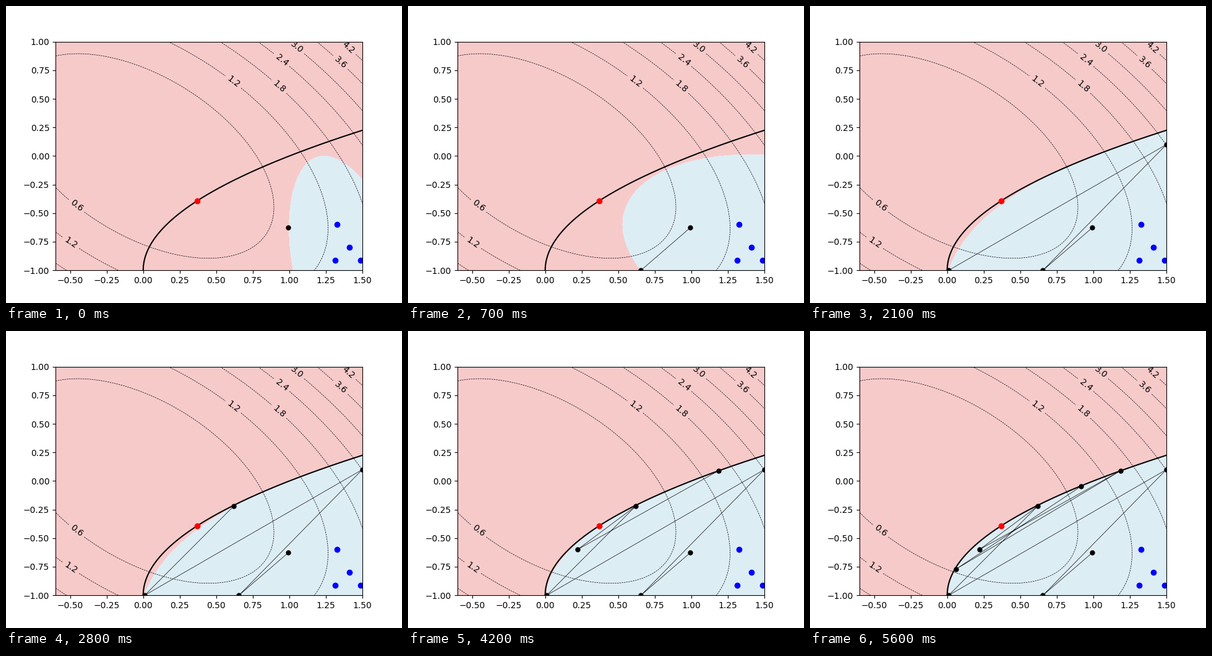
These frames come from a looping animation (640 px wide and 480 px high, 6300 ms). A matplotlib script:

```python
import numpy as np
import matplotlib.pyplot as plt
from matplotlib.animation import FuncAnimation

XMIN, XMAX, YMIN, YMAX = -0.6, 1.5, -1.0, 1.0
PINK, BLUE = "#f7caca", "#ddedf4"
ROOT = np.sqrt(XMAX)

# Sample points in the order they are visited
PATH = np.array([(0.993, -0.627), (0.655, -1), (1.5, 0.1), (0.01, -1),
                 (0.62, -0.219), (0.222, -0.599), (1.187, 0.09),
                 (0.06, -0.771), (0.917, -0.046)])
START = np.array([(1.327, -0.6), (1.413, -0.8), (1.315, -0.915), (1.487, -0.915)])

# Bezier controls (x, y + 1) of the first three feasible borders
EARLY = [
    [(1.03, -0.015), (0.925, 0.64), (1.09, 1.36), (1.5, 0.795)],
    [(0.666, -0.015), (0.27, 0.62), (0.8, 1.06), (1.5, 1.007)],
    [(0.141, 0), (0.2, 0.367), (0.436, 0.733), (1.5, 1.1)],
]


def controls(k):
    """Border controls at step k; a zero gap gives the true constraint."""
    if k < len(EARLY):
        return EARLY[k]
    gap = 0.13 if k < 6 else 0.03 * 0.5**(k - 6)
    return [(0.008, 0), (gap, ROOT/3), (XMAX/3 - gap/4, 2*ROOT/3), (XMAX, ROOT)]


def bezier(points):
    a, b, c, d = np.array(points)
    t = np.linspace(0, 1, 200)[:, None]
    u = 1 - t
    return u**3*a + 3*u*u*t*b + 3*u*t*t*c + t**3*d - (0, 1)


fig, ax = plt.subplots(figsize=(6.4, 4.8), dpi=100)
ax.set_xlim(XMIN, XMAX)
ax.set_ylim(YMIN, YMAX)
ax.set_facecolor(PINK)
region, = ax.fill([0, 1, 1], [0, 0, 1], color=BLUE, lw=0, antialiased=False)

# Objective
x, y = np.meshgrid(np.linspace(XMIN, XMAX, 200), np.linspace(YMIN, YMAX, 200))
cs = ax.contour(x, y, x**2 + x*y + y**2, levels=np.arange(1, 8)*0.6,
                colors="black", linewidths=0.5, linestyles="dashed")
ax.clabel(cs, fmt="%.1f", fontsize=10)

# Constraint and its best point
s = np.linspace(0, ROOT, 300)
ax.plot(s**2, s - 1, color="black", lw=1.5)
trail, = ax.plot([], [], "o-", color="black", lw=0.5, ms=5)
ax.plot(*START.T, "o", color="blue")
ax.plot(0.3684, -0.393, "o", color="red")


def update(k):
    region.set_xy(np.vstack([bezier(controls(k)), [(XMAX, YMIN - 0.015)]]))
    trail.set_data(*PATH[:k + 1].T)
    return region, trail


ani = FuncAnimation(fig, update, frames=len(PATH), interval=700,
                    repeat=True, repeat_delay=0)
plt.show()
```
